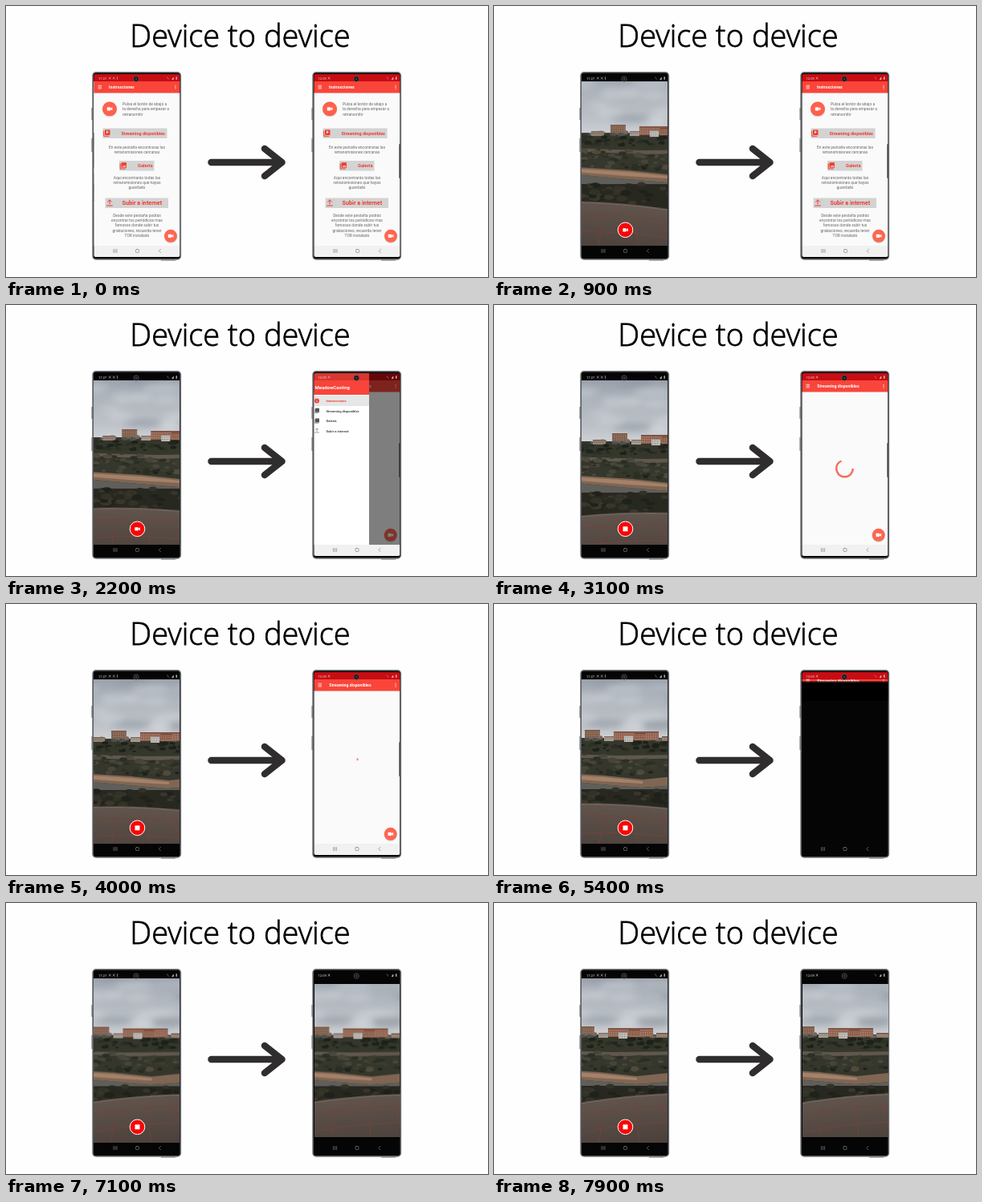
Recreate the animation shown at these times as an HTML page. Size 600 by 338 pixels, loop 8 s.

```html
<!DOCTYPE html>
<html lang="es">
<head>
<meta charset="utf-8">
<title>Device to device</title>
<style>
  html, body { margin: 0; width: 100%; height: 100%; overflow: hidden; background: #fefefe; }
  svg { display: block; width: 100vw; height: 100vh; }
  text { font-family: Roboto, "Noto Sans", sans-serif; }
  .title { font: 300 38px "Open Sans", "Noto Sans", sans-serif; stroke: #000; stroke-width: .8px; }
  .body { font-size: 4.95px; fill: #666; }
  .mid { text-anchor: middle; }
  .label { font-weight: 700; font-size: 5.4px; fill: #f23a2e; }
  .bar { font-weight: 700; font-size: 5.2px; fill: #fff; }
  .clock { font-size: 4.2px; fill: #ddd; }
  .item { font-weight: 700; font-size: 4.1px; fill: #444; }
  .line { fill: none; stroke-linecap: round; stroke-linejoin: round; }

  .pan, .floor, .intro-l, .stop, .intro-r, .list, .list-body, .drawer, .scrim,
  .tools, .cover, .video, .veil, .specks, .turn { animation: 8s linear infinite; }

  /* hand-held camera */
  .pan { animation-name: pan; }
  @keyframes pan {
    0%, 11% { transform: translate(145px, 160px); }
    18.75% { transform: translate(142px, 163px); }
    38.75% { transform: translate(147px, 172px); }
    50% { transform: translate(131px, 170px); }
    67.5% { transform: translate(113px, 169px); }
    78.75% { transform: translate(113px, 167px); }
    98.75%, 100% { transform: translate(106px, 166px); }
  }
  .floor { animation-name: floor; }
  @keyframes floor {
    0%, 11% { transform: translate(109px, 245px) skewY(5deg); }
    18.75% { transform: translate(109px, 247px) skewY(4.5deg); }
    38.75% { transform: translate(109px, 264px) skewY(-2deg); }
    50% { transform: translate(109px, 254px) skewY(2deg); }
    67.5% { transform: translate(109px, 250px) skewY(3deg); }
    78.75% { transform: translate(109px, 248px) skewY(-4deg); }
    98.75%, 100% { transform: translate(109px, 250px) skewY(-6deg); }
  }

  /* screen changes */
  .intro-l, .stop, .intro-r, .list, .list-body, .video { animation-timing-function: step-end; }
  .intro-l { animation-name: introL; }
  @keyframes introL { 0% { opacity: 1; } 11.25%, 100% { opacity: 0; } }
  .stop { animation-name: stop; }
  @keyframes stop { 0% { opacity: 0; } 28.75%, 100% { opacity: 1; } }
  .intro-r { animation-name: introR; }
  @keyframes introR { 0% { opacity: 1; } 27.5%, 100% { opacity: 0; } }
  .list { animation-name: list; }
  @keyframes list { 0% { opacity: 0; } 27.5% { opacity: 1; } 68.75%, 100% { opacity: 0; } }
  .list-body { animation-name: listBody; }
  @keyframes listBody { 0% { opacity: 1; } 66.25%, 100% { opacity: 0; } }
  .video { animation-name: video; }
  @keyframes video { 0% { opacity: 0; } 73.75%, 100% { opacity: 1; } }

  .drawer { animation-name: drawer; }
  @keyframes drawer {
    0%, 14.5% { transform: translateX(-76px); animation-timing-function: ease-out; }
    17.5%, 27% { transform: none; animation-timing-function: ease-in; }
    30%, 100% { transform: translateX(-76px); }
  }
  .scrim { animation-name: scrim; }
  @keyframes scrim {
    0%, 14.5% { opacity: 0; }
    17.5%, 27% { opacity: .6; }
    30%, 100% { opacity: 0; }
  }
  .tools { animation-name: tools; }
  @keyframes tools { 0%, 66.25% { transform: none; } 68.75%, 100% { transform: translateY(-10px); } }
  .cover { animation-name: cover; }
  @keyframes cover {
    0% { opacity: 0; transform: none; animation-timing-function: step-end; }
    66.25% { opacity: 1; transform: none; }
    68.75%, 100% { opacity: 1; transform: translateY(-23px); }
  }

  /* first pictures of the received stream */
  .veil { animation-name: veil; }
  @keyframes veil {
    0%, 73.75% { transform: translateX(70px); opacity: 1; }
    77.5%, 80% { transform: none; opacity: 1; }
    87.5%, 100% { transform: translateX(-130px); opacity: 0; }
  }
  .specks { animation-name: specks; }
  @keyframes specks { 0%, 75% { opacity: 0; } 78%, 80% { opacity: .75; } 87.5%, 100% { opacity: 0; } }

  /* spinner */
  .turn { transform-origin: 436.5px 204px; animation-name: turn; animation-timing-function: steps(6); }
  @keyframes turn { from { transform: rotate(-900deg); } to { transform: rotate(720deg); } }
  .arc { animation: arc 1333.333ms cubic-bezier(.4, 0, .2, 1) infinite; }
  @keyframes arc {
    0% { stroke-dasharray: 12 360; stroke-dashoffset: 0; }
    50% { stroke-dasharray: 270 360; stroke-dashoffset: 0; }
    100% { stroke-dasharray: 12 360; stroke-dashoffset: -270; }
  }
</style>
</head>
<body>
<svg viewBox="0 0 600 338" preserveAspectRatio="none">
  <defs>
    <linearGradient id="sky" x2="0" y2="1">
      <stop offset=".2" stop-color="#8f97a2"/><stop offset=".5" stop-color="#adb3bb"/>
      <stop offset=".8" stop-color="#bcc1c7"/><stop offset="1" stop-color="#d0d3d7"/>
    </linearGradient>
    <linearGradient id="ground" x2="0" y2="1">
      <stop stop-color="#61544d"/><stop offset=".5" stop-color="#50453f"/><stop offset="1" stop-color="#423834"/>
    </linearGradient>
    <filter id="soft" x="-40%" y="-60%" width="180%" height="220%"><feGaussianBlur stdDeviation="4"/></filter>
    <filter id="hazy"><feGaussianBlur stdDeviation=".5"/></filter>
    <clipPath id="screen"><rect x="109.5" y="85" width="106.8" height="228" rx="2"/></clipPath>
    <clipPath id="camera"><rect x="109.5" y="94" width="106.5" height="204.5"/></clipPath>
    <clipPath id="stream"><rect x="384" y="101" width="106.5" height="191"/></clipPath>

    <g id="cam"><rect x="-3.2" y="-2.1" width="4.4" height="4.2" rx=".6"/><path d="M1.2-.6 3.4-2V2L1.2.6z"/></g>

    <g id="fab">
      <circle cx="205" cy="287.8" r="8" fill="#000" opacity=".18"/>
      <circle cx="205" cy="286.8" r="8" fill="#ff6650"/>
      <use href="#cam" x="205" y="286.8" fill="#fff"/>
    </g>

    <g id="nav" class="line" stroke="#808080" stroke-width=".7">
      <path d="M134 303.500v4m2-4v4m2-4v4M192.500 303.300l-2.200 2.200 2.200 2.200"/>
      <rect x="161.500" y="303.500" width="4" height="4" rx="1"/>
    </g>

    <g id="signal" fill="#ddd" opacity=".85">
      <path d="M200.500 88.500l2 3M206.500 91.700l2-2.700v2.700z" stroke="#ddd" stroke-width=".5"/>
      <rect x="211.500" y="88.300" width="1.400" height="3.500"/>
    </g>

    <g id="hole">
      <circle cx="162" cy="91" r="3.200" fill="#111" stroke="#555" stroke-width=".8"/>
      <circle cx="162" cy="91" r="1.200" fill="#42485a"/>
    </g>

    <g id="redbar">
      <rect x="109" y="85" width="108" height="9.500" fill="#c70d14"/>
      <rect x="109" y="94" width="108" height="14.500" fill="#f9453a"/>
    </g>
    <g id="tools">
      <path d="M114.500 99.300h4.500m-4.500 1.800h4.500m-4.500 1.800h4.500" stroke="#fff" stroke-width=".75"/>
      <g fill="#fff"><circle cx="211" cy="99.300" r=".6"/><circle cx="211" cy="101.200" r=".6"/><circle cx="211" cy="103.100" r=".6"/></g>
    </g>
    <g id="page">
      <rect x="109" y="108" width="108" height="191" fill="#fafafa"/>
      <rect x="109" y="299" width="108" height="14" fill="#f1f1f1"/>
      <use href="#nav"/>
    </g>

    <g id="library"><path d="M-3.800-2.500v6.300h6.300" class="line" stroke="#f23a2e"/><rect x="-2.500" y="-4" width="6.500" height="6.500" rx=".6" fill="#f23a2e"/></g>
    <path id="upload" class="line" stroke="#f23a2e" d="M-3.500 3.500h7M0 1.500V-3.500M-2.500-1.200 0-3.700 2.500-1.200"/>

    <g id="intro">
      <use href="#page"/><use href="#redbar"/><use href="#tools"/>
      <text class="bar" x="128" y="103">Instrucciones</text>
      <circle cx="129" cy="129.300" r="9.300" fill="#ddd"/>
      <circle cx="129" cy="128.300" r="9" fill="#ff604c"/>
      <use href="#cam" x="129" y="128.300" fill="#fff"/>
      <g class="body">
        <text x="145" y="123.500">Pulsa el botón de abajo a</text>
        <text x="145" y="130">la derecha para empezar a</text>
        <text x="145" y="136.500">retransmitir</text>
      </g>
      <g fill="#d3d3d3">
        <rect x="120.500" y="152.500" width="80" height="12.500"/>
        <rect x="141" y="193" width="43.500" height="12.500"/>
        <rect x="123.500" y="239.500" width="78.500" height="12.500"/>
      </g>
      <use href="#library" x="125.500" y="158.500"/><path d="M125 155.300l3 2-3 2z" fill="#ddd"/>
      <use href="#library" x="146" y="199.300"/><path d="M144.500 200.700l1.500-2 1 1.200 1.200-1.600 1.400 2.400z" fill="#ddd"/>
      <use href="#upload" x="129" y="245.500"/>
      <text class="label" x="143.500" y="160.900">Streaming disponibles</text>
      <text class="label" x="164" y="201.400" style="font-size:5.800px">Galería</text>
      <text class="label" x="144.500" y="248.300" style="font-size:7.200px">Subir a internet</text>
      <g class="body mid">
        <text x="163" y="177.500">En este pestaña encontraras las</text>
        <text x="163" y="183.700">retransmisiones cercanas</text>
        <text x="163" y="215.500">Aqui encontrarás todas las</text>
        <text x="163" y="221.800">retransmisiones que hayas</text>
        <text x="163" y="228">guardado</text>
        <text x="163" y="262.700">Desde este pestaña podrás</text>
        <text x="163" y="269">encontrar los periódicos mas</text>
        <text x="163" y="275.300">famosos donde subir tus</text>
        <text x="163" y="281.500">grabaciones, recuerda tener</text>
        <text x="163" y="287.700">TOR instalado</text>
      </g>
      <use href="#fab"/>
    </g>

    <g id="shell">
      <path d="M107.200 127v15M107.200 165v17" stroke="#777" stroke-width="1.500"/>
      <path d="M193 317h18" stroke="#999" stroke-width="1.500"/>
      <rect x="108" y="82.800" width="109.400" height="233.200" rx="4" fill="#050505" stroke="#74777c" stroke-width="1.500"/>
    </g>
    <rect id="handle" x="489" y="172" width="2.200" height="43" rx="1" fill="#777b80"/>
  </defs>

  <rect width="600" height="338" fill="#fefefe"/>
  <text class="title" x="291.500" y="51" text-anchor="middle">Device to device</text>
  <path class="line" d="M255.500 195H342M322 178l21.500 17L322 212" stroke="#2f2d2e" stroke-width="8.500"/>

  <!-- sending phone -->
  <use href="#shell"/>
  <g clip-path="url(#screen)">
    <g clip-path="url(#camera)">
      <g id="view">
        <g class="pan" id="land"></g>
        <g class="floor" id="terrace"></g>
      </g>
    </g>
    <use href="#nav"/>
    <circle cx="163.500" cy="279.300" r="9.300" fill="#f80505" stroke="#fff" stroke-width="1"/>
    <use href="#cam" x="163.500" y="279.300" fill="#fff"/>
    <g class="stop">
      <circle cx="163.500" cy="279.300" r="7" fill="#f80505"/>
      <rect x="160.500" y="276.300" width="6" height="6" fill="#fff"/>
    </g>
    <g class="intro-l"><use href="#intro"/></g>
    <text class="clock" x="115" y="92">17:27</text>
    <path d="M128 88.500l2.500 3m0-3l-2.500 3M133 88.500l2.500 3m0-3l-2.500 3M138.500 88v4" stroke="#ccc" stroke-width=".6"/>
    <use href="#signal"/><use href="#hole"/>
  </g>

  <!-- receiving phone -->
  <use href="#shell" x="274"/>
  <g clip-path="url(#screen)" transform="translate(274)">
    <g transform="translate(-274)">
      <use href="#nav" x="273.500"/>
      <g clip-path="url(#stream)"><g class="video">
        <g id="copy" transform="translate(274)"></g>
        <g class="veil">
          <path d="M300 90H500V185C482 180 478 220 484 292H300z" fill="#82746c" opacity=".75" filter="url(#soft)"/>
          <path d="M240 60H492C487 130 482 165 466 188C450 215 440 250 431 320H240z" fill="#fff" filter="url(#soft)"/>
          <path d="M300 179.500H468" stroke="#f2dfc4" stroke-width=".8"/>
        </g>
        <g class="specks" id="specks"></g>
      </g></g>

      <g class="list">
        <g class="list-body">
          <use href="#page" x="273.500"/><use href="#fab" x="273.700"/><use href="#handle"/>
          <g class="turn"><circle class="arc" cx="436.500" cy="204" r="10.300" pathLength="360" fill="none" stroke="#f4705c" stroke-width="2.400"/></g>
        </g>
        <use href="#redbar" x="274"/>
        <g class="tools"><use href="#tools" x="274"/><text class="bar" x="402.300" y="103">Streaming disponibles</text></g>
        <rect class="cover" x="383" y="108.500" width="109" height="24"/>
      </g>
      <g class="intro-r"><use href="#intro" x="274"/><use href="#handle"/></g>
      <rect class="scrim" x="383" y="85" width="109" height="214"/>
      <g class="drawer">
        <rect x="383" y="85" width="73" height="214" fill="#fff"/>
        <rect x="383" y="85" width="73" height="9.500" fill="#d9362f"/>
        <rect x="383" y="94" width="73" height="18" fill="#f8443a"/>
        <text class="bar" x="388" y="105" style="font-size:6px">MeadowCasting</text>
        <rect x="383" y="113" width="73" height="13" fill="#e6e6e6"/>
        <circle cx="390.500" cy="119.500" r="2.900" fill="#f23a2e"/>
        <path d="M390.500 119v2m0-3.500v.7" stroke="#fff" stroke-width=".8"/>
        <g fill="#555"><rect x="388.500" y="128.700" width="5" height="5"/><rect x="388.500" y="141.500" width="5" height="5"/></g>
        <path d="M387.800 130v4.500h4.500M387.800 142.800v4.500h4.500M388 159h5M390.500 157.500v-3.500m-1.500 1.400 1.500-1.500 1.500 1.500" class="line" stroke="#777" stroke-width=".7"/>
        <g class="item">
          <text x="402" y="121" style="fill:#f23a2e">Instrucciones</text>
          <text x="402" y="133.500">Streaming disponibles</text>
          <text x="402" y="146">Galería</text>
          <text x="402" y="158.500">Subir a internet</text>
        </g>
      </g>
      <text class="clock" x="388.500" y="92">12:09</text>
      <path d="M401 88.500l2.200 3m0-3l-2.200 3" stroke="#ccc" stroke-width=".6"/>
      <use href="#signal" x="273.500"/><use href="#hole" x="274.200"/>
    </g>
  </g>
</svg>

<script>
  const byId = id => document.getElementById(id);
  let seed = 11;
  const rand = (a, b) => {
    seed = (seed * 16807) % 2147483647;
    return a + (b - a) * seed / 2147483647;
  };
  const pick = list => list[Math.floor(rand(0, list.length))];

  function add(parent, tag, attrs) {
    const node = document.createElementNS("http://www.w3.org/2000/svg", tag);
    for (const key in attrs) node.setAttribute(key, attrs[key]);
    parent.append(node);
    return node;
  }
  const rect = (parent, x, y, width, height, fill) => add(parent, "rect", { x, y, width, height, fill });
  const shape = (parent, d, fill) => add(parent, "path", { d, fill });

  function block(parent, x, y, w, h, wall, roof, glass) {
    rect(parent, x, y, w, h, wall);
    rect(parent, x, y, w, 1.2, roof);
    for (let row = y + 3; row < y + h - 1; row += 2.8)
      add(parent, "path", { d: `M${x + 1} ${row}h${w - 2}`, stroke: glass, "stroke-width": 1.2, "stroke-dasharray": "1.2 1.6" });
  }

  function trees(parent, n, top, bottom, size, colors, from = -55, to = 130) {
    for (let i = 0; i < n; i++) {
      const rx = rand(size * .6, size * 1.6);
      add(parent, "ellipse", {
        cx: rand(from, to).toFixed(1), cy: rand(top, bottom).toFixed(1),
        rx: rx.toFixed(1), ry: (rx * rand(.35, .6)).toFixed(1), fill: pick(colors)
      });
    }
  }

  // horizon lies at y = 0
  function buildLand(land) {
    rect(land, -60, -112, 200, 114, "url(#sky)");
    const clouds = add(land, "g", { filter: "url(#soft)", opacity: .55 });
    for (let i = 0; i < 22; i++)
      add(clouds, "ellipse", { cx: rand(-55, 130), cy: rand(-92, -14), rx: rand(10, 26), ry: rand(2.5, 7), fill: pick(["#d9dde2", "#cdd2d8", "#838c97"]) });

    const g = add(land, "g", { filter: "url(#hazy)" });
    rect(g, -60, -2, 200, 110, "#35362c");
    trees(g, 26, -3, 1, 3, ["#5d6165", "#4d524b", "#6b6662"]);
    block(g, -24, -4, 16, 6, "#948375", "#735e51", "#655a52");
    block(g, 0, -12, 19, 10, "#8f6d59", "#74503f", "#5c463a");
    block(g, 24, -4, 12, 6, "#a59d95", "#85604f", "#736c66");
    block(g, 36, -10, 56, 11, "#91604d", "#77483a", "#b5a294");
    block(g, 62, -8, 14, 9, "#9c6d58", "#6f4335", "#614338");
    block(g, 49, -5, 11, 8, "#c4c1bc", "#98928b", "#78736e");
    block(g, 96, -4, 26, 6, "#917767", "#705245", "#bfb3a9");

    const dark = ["#20261d", "#2a3024", "#343829", "#1c211a"];
    trees(g, 80, 3, 15, 3.5, dark);
    shape(g, "M-55 17L40 20 130 19V23L50 25-55 21z", "#5f584c");
    trees(g, 60, 18, 42, 4, ["#3a3c2c", "#46453a", "#2b2f23", "#504a3c"]);
    shape(g, "M-55 40L25 45 72 50 130 44V56L70 60 20 56-55 49z", "#7f6653");
    shape(g, "M-55 42L25 47 72 52V55L20 52-55 46z", "#a5816a");
    shape(g, "M-55 49L20 56 70 60 130 56V62H-55z", "#5f5e5a");
    trees(g, 20, 38, 45, 3, dark, 20, 130);
    rect(g, -60, 62, 200, 48, "#282821");
    trees(g, 60, 62, 86, 5, ["#252a21", "#1e221b", "#333227", "#3a362c"]);
  }

  function buildTerrace(g) {
    shape(g, "M-6 0Q50 -4 114 0V90H-6z", "url(#ground)");
    add(g, "path", { d: "M-6 0Q50 -4 114 0", fill: "none", stroke: "#766a62", "stroke-width": 1.4 });
    add(g, "path", {
      d: "M-6 15Q50 10 114 14M-6 37Q50 30 114 35M28 12L18 70M66 11L74 70M98 12L118 60",
      fill: "none", stroke: "#6e463c", "stroke-width": 1.5, opacity: .7
    });
  }

  buildLand(byId("land"));
  buildTerrace(byId("terrace"));
  for (const part of [...byId("view").children]) {
    const twin = part.cloneNode(true);
    twin.removeAttribute("id");
    byId("copy").append(twin);
  }
  for (let i = 0; i < 150; i++)
    rect(byId("specks"), rand(428, 490), rand(262, 292), rand(1, 3), 1, pick(["#f0574c", "#f59a90", "#fff", "#8b8f96", "#d6b4ac"]));
</script>
</body>
</html>
```
